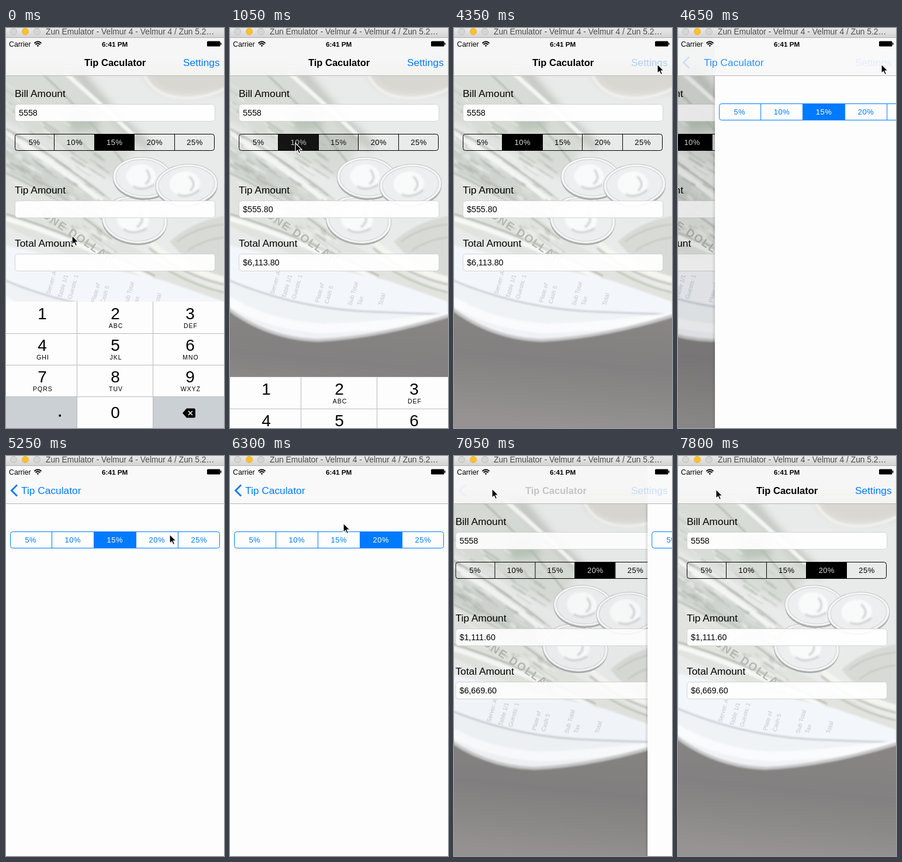
Write an HTML page that moves like this. It is 373x684 px and loops after 8 s.

```html
<!DOCTYPE html>
<html lang="en">
<head>
<meta charset="utf-8">
<title>Tip Caculator</title>
<style>
html, body { margin: 0; width: 100%; height: 100%; overflow: hidden; background: #fdfdfd; }
svg { display: block; }
text { font: 17.35px "Liberation Sans", Arial, sans-serif; white-space: pre; }
.bold { font-size: 16.5px; font-weight: bold; }
.value { font-size: 14.3px; }
.seg { font-size: 13px; letter-spacing: .5px; text-anchor: middle; }
.digit { font-size: 28px; text-anchor: middle; }
.letters { font-size: 10.5px; letter-spacing: 1px; text-anchor: middle; }
.print { font-size: 10px; fill: #9fa9b8; opacity: .6; }
.note { font-size: 19px; font-weight: bold; fill: #b3b8b0; letter-spacing: 2px; }
.blue { fill: #007aff; }
</style>
</head>
<body>
<svg id="stage" width="373" height="684" viewBox="0 0 373 684">
  <defs>
    <linearGradient id="chrome" x2="0" y2="1">
      <stop stop-color="#e9e9e9"/><stop offset="1" stop-color="#d2d2d2"/>
    </linearGradient>
    <linearGradient id="table" gradientUnits="userSpaceOnUse" x1="200" y1="480" x2="180" y2="684">
      <stop stop-color="#888584"/><stop offset=".45" stop-color="#828080"/><stop offset="1" stop-color="#969392"/>
    </linearGradient>
    <linearGradient id="edge"><stop stop-color="#000" stop-opacity="0"/><stop offset="1" stop-color="#000" stop-opacity=".12"/></linearGradient>
    <filter id="soft" x="-10%" y="-10%" width="120%" height="120%"><feGaussianBlur stdDeviation="1.6"/></filter>
    <filter id="haze" x="-20%" y="-20%" width="140%" height="140%"><feGaussianBlur stdDeviation="7"/></filter>
  </defs>

  <g id="main">
    <g id="photo">
      <rect width="500" height="684" fill="#e9ebea"/>
      <g filter="url(#haze)">
        <path d="M-20 60H110L230 190 190 260-20 150Z" fill="#d8dcd6"/>
        <path d="M95 140l50-4 18 36-50 6z" fill="#b9c4b8"/>
        <path d="M-20 180L160 285 140 330-20 245Z" fill="#cfd4cf"/>
        <path d="M120 70Q170 140 245 205" fill="none" stroke="#c3c5c0" stroke-width="16"/>
        <path d="M228 60Q240 116 310 116 360 116 400 96V60Z" fill="#d9d7d1"/>
      </g>
      <g filter="url(#soft)">
        <path d="M236 80Q256 122 314 120 352 118 385 98" fill="none" stroke="#f0f0ed" stroke-width="5"/>
        <path d="M100 76Q160 128 220 185" fill="none" stroke="#f5f6f4" stroke-width="7"/>
        <path d="M60 76Q140 150 205 235M0 172Q90 222 180 296" fill="none" stroke="#b6bcb5" stroke-width="3"/>
        <path d="M0 183Q90 234 178 308" fill="none" stroke="#f3f5f2" stroke-width="9"/>
        <path d="M0 245Q100 290 200 365L340 440 373 452V472L250 440 100 385 0 340Z" fill="#e1e4de"/>
        <path d="M0 248Q90 290 165 348M0 318Q110 350 255 424" fill="none" stroke="#b3b9b2" stroke-width="3"/>
        <path d="M0 326Q110 358 250 430" fill="none" stroke="#f7f8f6" stroke-width="8"/>
        <path d="M280 365Q320 330 373 322V425Q315 410 280 365Z" fill="#d8dad6"/>
        <path d="M292 366Q325 340 373 336M310 382Q335 362 373 358" fill="none" stroke="#bfc3be" stroke-width="2"/>
        <path d="M248 368Q300 412 373 430" fill="none" stroke="#f5f5f0" stroke-width="9"/>
        <path d="M245 376Q300 422 373 439M255 400Q310 438 373 452" fill="none" stroke="#c2c1b7" stroke-width="3"/>
      </g>
      <g id="engraving" filter="url(#soft)"></g>
      <text class="note" transform="translate(60 322) rotate(34)">ONE DOLLAR</text>
      <g id="coins"></g>
      <g filter="url(#soft)">
        <path d="M0 372Q140 402 270 432L373 468V520H0Z" fill="#f3f6fa"/>
        <path d="M-10 428Q100 478 220 484 300 488 390 490V560H-10Z" fill="#f0f3f6"/>
        <path d="M-10 428Q100 476 220 484 300 488 390 490" fill="none" stroke="#c0c6ce" stroke-width="2.500"/>
        <path d="M-10 462Q60 508 160 514 270 510 390 492" fill="none" stroke="#fafbfc" stroke-width="16"/>
      </g>
      <g filter="url(#soft)">
        <path d="M-10 476Q60 532 150 535 260 530 390 488V700H-10Z" fill="url(#table)"/>
        <path d="M-10 475Q60 531 150 534 260 529 390 487" fill="none" stroke="#c9c9c9" stroke-width="5"/>
      </g>
      <g id="receipt"></g>
    </g>
    <g id="form"></g>
    <rect id="dim" y="17" width="500" height="667" opacity="0"/>
  </g>

  <g id="keypad"></g>

  <g id="settings">
    <rect x="-5" y="81" width="5" height="603" fill="url(#edge)"/>
    <rect width="373" height="684" fill="#fdfdfd"/>
  </g>

  <rect y="17" width="373" height="64" fill="#f8f8f8" opacity=".86"/>
  <path d="M0 81.500H373" stroke="#b6b6b6"/>
  <path id="chevron" class="blue" d="M18 48.500l2 2-8.500 8.500 8.500 8.500-2 2L7.500 59z"/>
  <text id="title" class="bold" y="65">Tip Caculator</text>
  <text id="back" class="blue" y="65">Tip Caculator</text>
  <text id="link" class="blue" x="303" y="65">Settings</text>

  <text x="5" y="31.500" style="font-size:12.300px">Carrier</text>
  <text x="164" y="31.500" style="font-size:11.700px;font-weight:bold">6:41 PM</text>
  <g fill="none" stroke="#000" stroke-width="1.800">
    <path d="M48.500 26Q54.500 20.500 60.500 26M50.500 28.300Q54.500 24.700 58.500 28.300"/>
    <path d="M54.500 32l-2-2q2-1.600 4 0z" fill="#000" stroke="none"/>
  </g>
  <rect x="344" y="22.500" width="22.500" height="9" rx="1.500"/>
  <rect x="367" y="25" width="1.500" height="4" rx=".7"/>

  <rect width="373" height="17" fill="url(#chrome)"/>
  <path d="M0 16.500H373" stroke="#b5b5b5"/>
  <g stroke="#bebebe">
    <circle cx="13" cy="6" r="5.500" fill="#d6d6d6"/>
    <circle cx="33" cy="6" r="5.500" fill="#fdbf2f" stroke="#f0b432"/>
    <circle cx="53" cy="6" r="5.500" fill="#d6d6d6"/>
  </g>
  <text x="68" y="11" fill="#4c4c4c" style="font-size:13.800px">Zun Emulator - Velmur 4 - Velmur 4 / Zun 5.2…</text>

  <path id="cursor" d="M0 0V15.500L3.600 12.200 6 17.600 8.600 16.500 6.200 11.200H11Z" stroke="#fff" stroke-width="1.200"/>
</svg>
<script>
const $ = id => document.getElementById(id);
const LOOP = 8000, STEP = 150, W = 373, PARALLAX = 112;
const add = (id, markup) => $(id).insertAdjacentHTML('beforeend', markup);
const clamp = v => Math.max(0, Math.min(1, v));

// --- static parts ---
let seed = 7;
const random = () => (seed = seed * 16807 % 2147483647) / 2147483647;

// short engraved strokes along the slope of the notes
let strokes = '';
for (let i = 0; i < 150; i++) {
  const x = random() * 190 - 20, y = 95 + x * .65 + random() * 190, len = 6 + random() * 26;
  const tone = random() < .55 ? '#aab1a9' : '#f4f6f3';
  strokes += `<path d="M${x} ${y}l${len} ${len * .66}" stroke="${tone}" stroke-width="${1 + random() * 3}" opacity=".55"/>`;
}
add('engraving', strokes);

const coin = (x, y, rx, ry, turn) => `<g transform="translate(${x} ${y}) rotate(${turn})">
  <ellipse cy="3" rx="${rx}" ry="${ry}" fill="#a9aba9"/>
  <ellipse rx="${rx}" ry="${ry}" fill="#f4f5f5" stroke="#c3c5c5"/>
  <ellipse rx="${rx - 5}" ry="${ry - 4}" fill="#eceeef" stroke="#d0d3d4"/>
  <ellipse cx="-3" cy="-2" rx="${rx * .5}" ry="${ry * .6}" fill="#f9fafa" filter="url(#soft)"/>
  <path d="M${-rx * .3} ${ry * .45}Q0 ${ry * .7} ${rx * .4} ${ry * .3}M${rx * .1} ${-ry * .4}Q${rx * .35} 0 ${rx * .1} ${ry * .3}"
    fill="none" stroke="#cbcecf" stroke-width="3" filter="url(#soft)"/></g>`;
add('coins', coin(220, 328, 56, 40, 8) + coin(234, 256, 51, 35, 4) + coin(309, 268, 53, 35, -4));

const print = (x, y, s) => `<text class="print" transform="translate(${x} ${y}) rotate(-74)">${s}</text>`;
add('receipt', print(75, 456, 'Server: A') + print(95, 462, 'Table 1/1') + print(112, 464, 'Guests: 1') +
  print(152, 470, 'Plate of') + print(168, 472, 'Cash 5') + print(208, 475, 'Sub Total') +
  print(224, 475, 'Tax') + print(260, 475, 'Total'));

const field = (label, y, id) => `<text x="15" y="${y}">${label}</text>
  <rect x="15.500" y="${y + 12.5}" width="342" height="29" rx="5" fill="#fff" fill-opacity=".93" stroke="#d2d4d5"/>
  <text class="value" id="${id}" x="22" y="${y + 32}"></text>`;

const segments = (name, x, y, width, color, on) => {
  const pitch = (width + 1) / 5;
  let s = '';
  for (let i = 0; i < 5; i++) {
    const start = x - 1 + i * pitch, left = Math.floor(start), right = Math.floor(start + pitch);
    const label = fill =>
      `<text class="seg" x="${start + pitch / 2 + .3}" y="${y + 19}" fill="${fill}">${5 * (i + 1)}%</text>`;
    s += label(color) + `<g id="${name}${5 * (i + 1)}" opacity="0">
      <rect x="${left}" y="${y}" width="${right - left}" height="29" fill="${color}"/>${label(on)}</g>`;
    if (i) s += `<path d="M${left + .5} ${y}v29" stroke="${color}"/>`;
  }
  return s + `<rect x="${x + .5}" y="${y + .5}" width="${width - 1}" height="28" rx="4" fill="none" stroke="${color}"/>`;
};
add('form', field('Bill Amount', 118, 'bill') + field('Tip Amount', 283, 'tip') + field('Total Amount', 374, 'total') +
  segments('m', 15, 181, 342, '#000', '#d6dada') +
  '<rect id="caret" x="54" y="136" width="2" height="18" fill="#426bf2"/>');
add('settings', segments('s', 7, 129, 359, '#007aff', '#fff'));
$('bill').textContent = '5558';

const letters = ['', 'ABC', 'DEF', 'GHI', 'JKL', 'MNO', 'PQRS', 'TUV', 'WXYZ'];
const columns = [62, 187, 315];
add('keypad', `<rect y="468" width="373" height="216" fill="#fdfdfd"/>
  <path d="M0 630H121V684H0ZM252 630H373V684H252Z" fill="#cbd0d5"/>
  <path d="M0 522.500H373M0 576.500H373M0 630.500H373M121.500 468V684M251.500 468V684" stroke="#b9bcbf"/>` +
  letters.map((s, i) => {
    const x = columns[i % 3], y = 498 + 54 * Math.floor(i / 3);
    return `<text class="digit" x="${x}" y="${y}">${i + 1}</text><text class="letters" x="${x + 1}" y="${y + 15}">${s}</text>`;
  }).join('') +
  `<text class="digit" x="187" y="667">0</text><rect x="90.500" y="661" width="3.500" height="3.500"/>
  <path d="M302 658.500L309 650.500H321.500Q324 650.500 324 653V664Q324 666.500 321.500 666.500H309Z"/>
  <path d="M312 655l7 7m0-7l-7 7" stroke="#fff" stroke-width="1.500"/>`);

// --- motion ---
// cubic-bezier(.25, .1, .25, 1)
const ease = x => {
  if (x <= 0 || x >= 1) return clamp(x);
  const curve = (u, a, b) => 3 * u * (1 - u) ** 2 * a + 3 * u * u * (1 - u) * b + u ** 3;
  let lo = 0, hi = 1;
  for (let i = 0; i < 24; i++) {
    const mid = (lo + hi) / 2;
    curve(mid, .25, .25) < x ? lo = mid : hi = mid;
  }
  return curve(lo, .1, 1);
};

// time, x, y
const path = [
  [0, 113, 355], [150, 114, 318], [300, 115, 240], [450, 112, 197], [1350, 112, 197],
  [1500, 130, 188], [1650, 195, 150], [1800, 274, 109], [1950, 308, 84], [2100, 331, 70],
  [2250, 345, 64], [2400, 348, 62], [4800, 348, 62], [4950, 344, 80], [5100, 316, 114],
  [5250, 280, 134], [5400, 258, 143], [6150, 258, 143], [6300, 194, 115], [6450, 96, 66],
  [6600, 65, 56], [7650, 65, 56], [7800, 65, 57], [LOOP, 65, 57]
];
const pointer = t => {
  const i = path.findIndex(p => p[0] > t), [t0, x0, y0] = path[i - 1], [t1, x1, y1] = path[i];
  const k = (t - t0) / (t1 - t0);
  return [x0 + (x1 - x0) * k, y0 + (y1 - y0) * k];
};

const set = (id, name, value) => $(id).setAttribute(name, value);
const fade = (id, v) => set(id, 'opacity', clamp(v));
const shift = (id, x, y) => set(id, 'transform', `translate(${x} ${y})`);

function render(t) {
  const push = ease((t - 4385) / 500), pop = ease((t - 6748) / 500);
  const popping = t >= 6600, shown = popping ? 1 - pop : push;

  shift('main', -PARALLAX * shown, 0);
  shift('settings', W * (1 - shown), 0);
  set('settings', 'visibility', shown > 0 ? 'visible' : 'hidden');
  fade('dim', .1 * shown);
  shift('keypad', 0, 216 * ease((t - 912) / 400));

  // navigation bar
  const titleX = 26 + 108 * (1 - shown);
  set('title', 'x', titleX);
  set('back', 'x', titleX);
  if (popping) {
    const late = (pop - .86) / .14, press = t < 6750 ? .3 : 1;
    fade('title', late);
    fade('link', late);
    fade('back', (1 - 2 * pop) * press);
    fade('chevron', (1 - 1.07 * pop) * press);
  } else {
    fade('title', 1 - 2 * push);
    fade('link', t === 4350 ? .3 : 1 - 1.1 * push);
    fade('back', push);
    fade('chevron', (push - .8) * 5);
  }

  // selections
  const ten = clamp((t - 900) / 165), twenty = clamp((t - 5535) / 200);
  fade('m15', 1 - ten);
  fade('m10', popping ? 0 : ten);
  fade('m20', popping ? 1 : 0);
  fade('s15', 1 - twenty);
  fade('s20', twenty);
  $('tip').textContent = t < 900 ? '' : popping ? '$1,111.60' : '$555.80';
  $('total').textContent = t < 900 ? '' : popping ? '$6,669.60' : '$6,113.80';
  fade('caret', t >= 450 && t < 900 ? 1 : 0);

  shift('cursor', ...pointer(t));
}

const start = performance.now();
function tick() {
  const t = (performance.now() - start) % LOOP;
  render(Math.floor(t / STEP) * STEP);
  requestAnimationFrame(tick);
}
tick();
</script>
</body>
</html>
```
